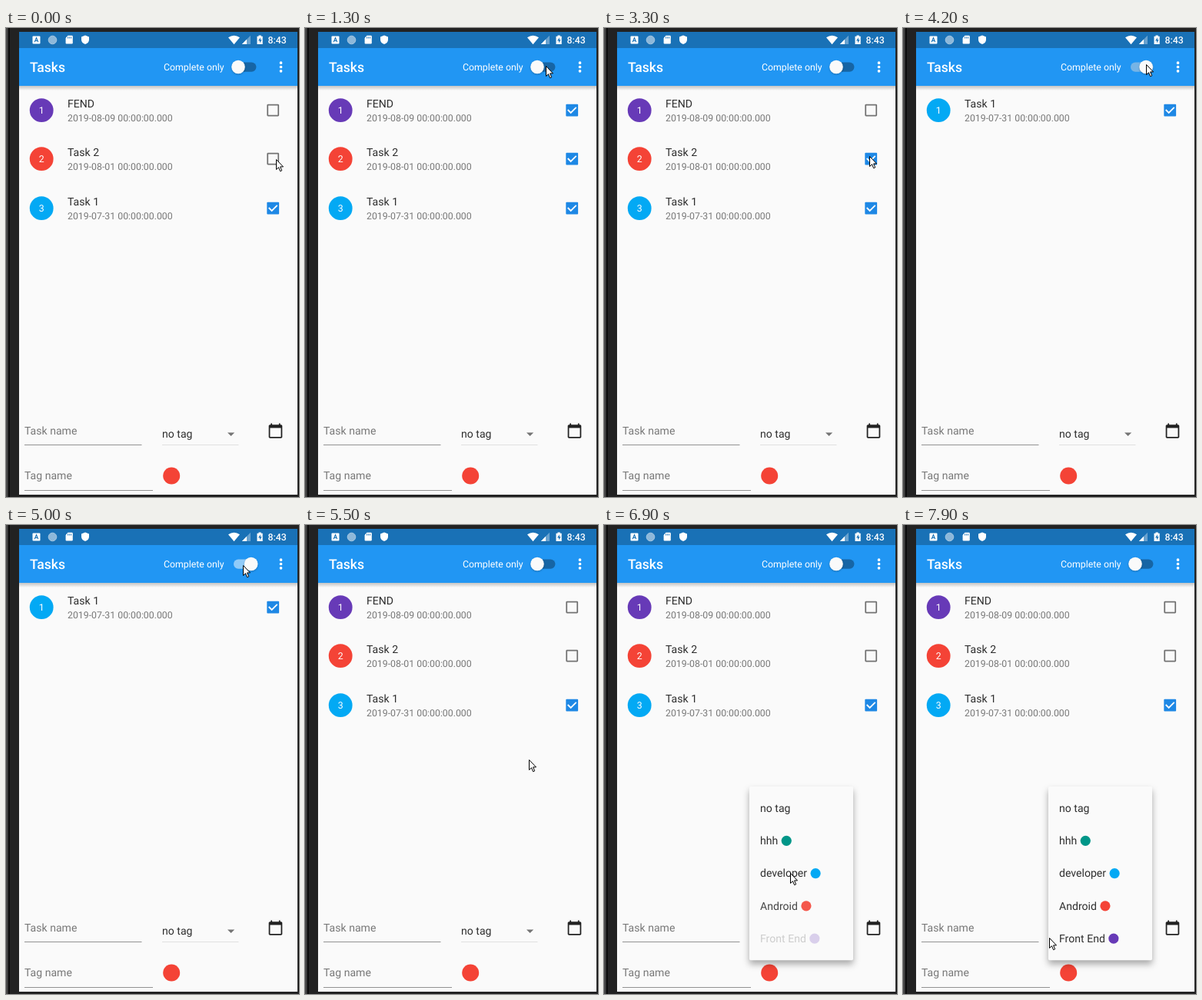
Animation, 381 px wide and 608 px high, one loop 8 s. Source, as an HTML page:

```html
<!DOCTYPE html>
<html lang="en">
<head>
<meta charset="utf-8">
<title>Task list</title>
<style>
  html, body { margin: 0; width: 100%; height: 100%; overflow: hidden; background: #222; }
  svg { display: block; width: 381px; height: 608px; }
  text { font: 14.08px Roboto, sans-serif; fill: #000; fill-opacity: .82; text-rendering: geometricPrecision; }
  .small { font-size: 12.32px; }
  .hint { fill-opacity: .52; }
  .white { fill: #fff; fill-opacity: 1; }
  .bold { font-weight: 500; }
  #menu { filter: drop-shadow(0 5px 4px rgba(0, 0, 0, .33)); }
  #thumb { filter: drop-shadow(0 1px 1px rgba(0, 0, 0, .25)); }
</style>
</head>
<body>
<svg viewBox="0 0 381 608">
  <defs>
    <linearGradient id="edge"><stop stop-color="#555"/><stop offset="1" stop-color="#303030"/></linearGradient>
    <linearGradient id="shade" x2="0" y2="1"><stop stop-opacity=".22"/><stop offset="1" stop-opacity="0"/></linearGradient>
  </defs>

  <!-- Device and app bar -->
  <rect width="381" height="608" fill="#222"/>
  <rect width="3" height="608" fill="url(#edge)"/>
  <rect x="3" width="2" height="608" fill="#0c0c0c"/>
  <rect x="17" y="5" width="362" height="600" fill="#fafafa"/>
  <rect x="17" y="75" width="362" height="6" fill="url(#shade)"/>
  <rect x="17" y="5" width="362" height="21" fill="#1971b6"/>
  <rect x="17" y="26" width="362" height="49" fill="#2196f3"/>

  <!-- Status bar -->
  <g fill="#fff">
    <rect x="34.5" y="10.5" width="10" height="10" rx="1"/>
    <path d="M37.2 18.3L39.5 12.7L41.8 18.3M38 16.5h3" fill="none" stroke="#1971b6" stroke-width="1.1"/>
    <circle cx="60.5" cy="15.5" r="5.3" fill="#8db8da" stroke="#a9cae4"/>
    <path d="M80.5 9.8h5.2q1.1 0 1.1 1.1v8.6q0 1.1-1.1 1.1h-7q-1.1 0-1.1-1.1v-6.6z"/>
    <path d="M80.6 11.5v2M82.6 11.5v2M84.6 11.5v2" stroke="#1971b6"/>
    <path d="M103 9.5l5 2v3.5q0 4.4-5 6q-5-1.6-5-6v-3.5z"/>
    <path d="M289 12.3q7.5-5 15 0L296.5 21.3z"/>
    <path d="M318 9.8v11.2h-11.2z" opacity=".35"/>
    <path d="M313 14.8v6.2h-6.2z"/>
    <path d="M326.5 10.8h2v-1.3h3.2v1.3h2v10.2h-7.2z"/>
    <path d="M331 12.3l-3 4.2h2v3l2.6-4.3h-1.8z" fill="#1971b6"/>
  </g>
  <text class="small white bold" x="340.5" y="20">8:43</text>

  <text class="white bold" x="31" y="57" style="font-size:17.6px">Tasks</text>
  <text class="small white" x="205" y="55">Complete only</text>
  <rect id="track" x="296" y="44.4" width="29.4" height="12.3" rx="6.15"/>
  <circle id="thumb" cy="50.5" r="8.8" fill="#fafafa"/>
  <path d="M357.5 45.2v0m0 5.3v0m0 5.3v0" stroke="#fff" stroke-width="3.7" stroke-linecap="round"/>

  <g id="rows"></g>

  <!-- Entry form -->
  <text class="hint" x="24" y="526.5">Task name</text>
  <path d="M24 540.5H176.5M24 599.5H191" stroke="#929292"/>
  <text x="203" y="531">no tag</text>
  <path d="M203 540.5H302.5" stroke="#e0e0e0"/>
  <path d="M288 524.5h9.2l-4.6 4.6z" fill="#747474"/>
  <path transform="translate(339.9 511.5) scale(.88)" fill="#222" d="M20 3h-1V1h-2v2H7V1H5v2H4c-1.1 0-2 .9-2 2v16c0 1.1.9 2 2 2h16c1.1 0 2-.9 2-2V5c0-1.1-.9-2-2-2zm0 18H4V8h16v13z"/>
  <text class="hint" x="24" y="585">Tag name</text>
  <circle cx="215.2" cy="580.5" r="11" fill="#f44336"/>

  <g id="menu"><rect id="panel" x="189" y="339" width="135" rx="1.8" fill="#fafafa"/><g id="items"></g></g>

  <path id="cursor" d="M.5 .5V13.5L3.5 10.7L5.6 15.7L7.7 14.8L5.6 9.9H9.5Z" fill="#fff" stroke="#000"/>
</svg>
<script>
const $ = id => document.getElementById(id);
const LOOP = 8000, STEP = 100, ROW = 63.36, ITEM = 42.24;
const PURPLE = '#673ab7', RED = '#f44336', BLUE = '#03a9f4', TEAL = '#009688';

const tasks = [
  { name: 'FEND', date: '2019-08-09', color: PURPLE, done: t => within(t, 700, 3100) },
  { name: 'Task 2', date: '2019-08-01', color: RED, done: t => within(t, 200, 3400) },
  { name: 'Task 1', date: '2019-07-31', color: BLUE, done: () => true },
];
const tags = { 'no tag': null, hhh: TEAL, developer: BLUE, Android: RED, 'Front End': PURPLE };

// When "Complete only" is on
const filtered = [[1400, 2450], [4100, 5200]];

// Where the pointer turns or rests: time, x, y
const stops = [
  [0, 351, 170], [400, 344, 95], [900, 341, 135], [1300, 313, 49], [1800, 317, 78],
  [2300, 314, 50], [2800, 348, 114], [3300, 345, 166], [3900, 317, 46], [5200, 307, 52],
  [5800, 274, 555], [5950, 276, 620], [6500, 249, 530], [7200, 238, 399], [7600, 238, 408],
  [7900, 190, 535], [LOOP, 190, 535],
];

const within = (t, start, end) => t >= start && t < end;
const ramp = (t, start, length) => Math.min(1, Math.max(0, (t - start) / length));
const ease = p => p * p * (3 - 2 * p);

function pointer(t) {
  const i = stops.findIndex(stop => stop[0] > t);
  const [t0, x0, y0] = stops[i - 1], [t1, x1, y1] = stops[i];
  const p = ease(ramp(t, t0, t1 - t0));
  return [x0 + (x1 - x0) * p, y0 + (y1 - y0) * p];
}

function checkbox(checked) {
  return checked
    ? `<rect x="339.3" y="98.8" width="15.8" height="15.8" rx="1" fill="#1e88e5"/>
       <path d="M341.7 106l3.9 3.9l7.1-7.1" fill="none" stroke="#fff" stroke-width="1.8"/>`
    : `<rect x="340.2" y="99.7" width="14" height="14" rx=".6" fill="none" stroke="#737373" stroke-width="1.76"/>`;
}

function row({ name, date, color }, checked, i) {
  return `<g transform="translate(0 ${Math.round(i * ROW)})">
    <circle cx="46.2" cy="106.7" r="15.4" fill="${color}"/>
    <text class="small white" x="46.2" y="111" text-anchor="middle">${i + 1}</text>
    <text x="80" y="103">${name}</text>
    <text class="small hint" x="80" y="121">${date} 00:00:00.000</text>
    ${checkbox(checked)}</g>`;
}

function buildMenu() {
  const centre = i => 367.1 + i * ITEM;
  $('items').innerHTML = Object.entries(tags).map(([name, color], i) =>
    `<g><text x="203" y="${Math.round(centre(i) + 4.7)}">${name}</text>` +
    (color ? `<circle cy="${centre(i)}" r="6.6" fill="${color}"/>` : '') + '</g>').join('');
  for (const dot of $('items').querySelectorAll('circle'))
    dot.setAttribute('cx', 214 + dot.previousSibling.getComputedTextLength());
}

let shownRows = '';
function drawRows(t) {
  const completeOnly = filtered.some(([start, end]) => within(t, start, end));
  const html = tasks.filter(task => task.done(t) || !completeOnly)
    .map((task, i) => row(task, task.done(t), i)).join('');
  if (html !== shownRows) $('rows').innerHTML = shownRows = html;
}

function drawSwitch(t) {
  const slide = time => ramp(t, time - 50, 200);
  const on = ease(filtered.reduce((sum, [start, end]) => sum + slide(start) - slide(end), 0));
  const shade = Math.round(255 * on);
  $('thumb').setAttribute('cx', 302 + 16.7 * on);
  $('track').setAttribute('fill', `rgba(${shade},${shade},${shade},${.32 + .18 * on})`);
}

function drawMenu(t) {
  const open = ramp(t, 6650, 300);
  $('menu').style.display = open ? '' : 'none';
  $('menu').style.opacity = ramp(open, 0, .25);
  $('panel').setAttribute('height', ITEM + 183 * ramp(open, .25, .25));
  [...$('items').children].forEach((item, i) => {
    item.style.opacity = i ? ramp(open, .5 + i * .077, .115) : 1;
  });
}

function frame(now) {
  const t = Math.floor(now % LOOP / STEP) * STEP;
  drawRows(t);
  drawSwitch(t);
  drawMenu(t);
  $('cursor').setAttribute('transform', `translate(${pointer(t).map(Math.round)})`);
  requestAnimationFrame(frame);
}
buildMenu();
frame(0);
</script>
</body>
</html>
```
